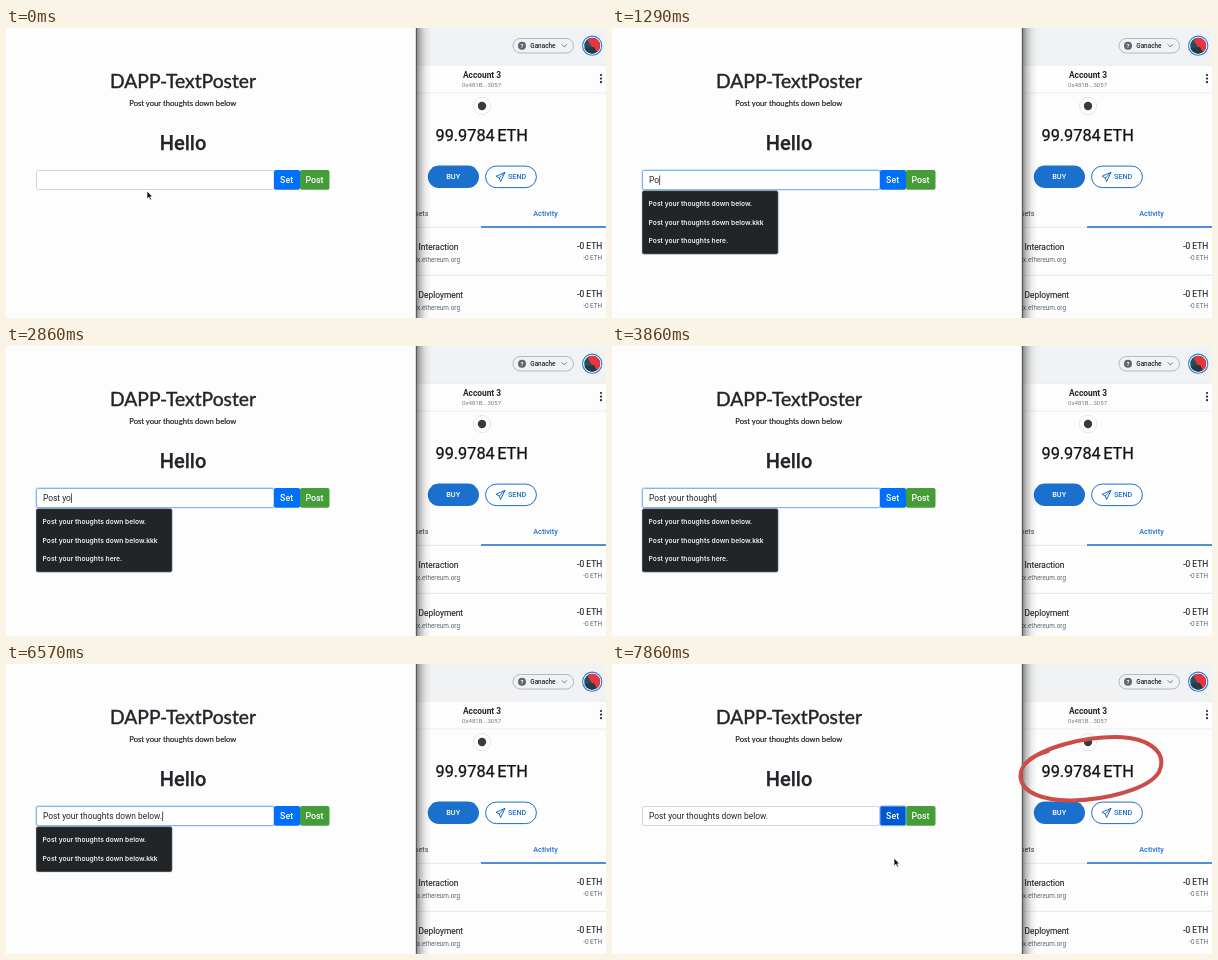
Write an HTML page that moves like this. It is 600 by 290 pixels and loops after 8000 ms.

```html
<!DOCTYPE html>
<html lang="en">
<head>
<meta charset="utf-8">
<title>DAPP-TextPoster</title>
<style>
  html, body { margin: 0; width: 100%; height: 100%; overflow: hidden; background: #fdfdfd; }
  svg { display: block; width: 600px; height: 290px; }
  text { font-family: Roboto, "Open Sans", sans-serif; fill: #212529; white-space: pre; }
  .lato { font-family: Lato, sans-serif; stroke: #212529; stroke-width: .4px; }
  .mid { text-anchor: middle; }
  .end { text-anchor: end; }
  .med { font-weight: 500; }
  .row { font-size: 8.4px; stroke: #212529; stroke-width: .12px; }
  .sub { font-size: 6.4px; fill: #5d6670; }
  .tab { font-size: 7.3px; font-weight: 500; }
  .sum { font-size: 16.3px; fill: #111; stroke: #111; stroke-width: .25px; }
  .field { font-size: 8.4px; }
  .btn { font-size: 8.8px; font-weight: 500; fill: #fff; text-anchor: middle; }
  #menu text { font: 600 6.7px Inter, sans-serif; fill: #f1f1f1; }
</style>
</head>
<body>
<svg viewBox="0 0 600 290">
  <defs>
    <linearGradient id="shade">
      <stop offset="0" stop-color="#000" stop-opacity=".5"/>
      <stop offset=".25" stop-color="#000" stop-opacity=".27"/>
      <stop offset=".6" stop-color="#000" stop-opacity=".08"/>
      <stop offset="1" stop-color="#000" stop-opacity="0"/>
    </linearGradient>
    <clipPath id="face"><circle cx="586.2" cy="17.7" r="8"/></clipPath>
    <clipPath id="side"><path d="M410 0H600V290H410Z"/></clipPath>
  </defs>
  <rect width="600" height="290" fill="#fdfdfd"/>

  <g clip-path="url(#side)">
    <rect x="410" width="190" height="37" fill="#f1f2f3"/>
    <path d="M410 37.3H600M410 65H600" stroke="#e4e6e8" stroke-width=".7"/>

    <rect x="507" y="10.5" width="60.5" height="14.5" rx="7.2" fill="none" stroke="#b4b8bd"/>
    <circle cx="516" cy="17.7" r="4" fill="#5d6670"/>
    <text class="mid" x="516" y="20" font-size="6" font-weight="700" style="fill:#fff">?</text>
    <text class="med" x="524.3" y="20.2" font-size="6.4">Ganache</text>
    <path d="M555.8 16.4l2.5 2.5 2.5-2.5" fill="none" stroke="#555" stroke-width=".8"/>

    <circle cx="586.2" cy="17.7" r="9.6" fill="#fff" stroke="#2f7fd0" stroke-width="1.1"/>
    <g clip-path="url(#face)">
      <rect x="576" y="8" width="20" height="20" fill="#24505c"/>
      <path d="M583 8H596V28H592L582 13Z" fill="#e8353f"/>
      <path d="M577 20L588 19 593 28H577Z" fill="#243b46"/>
    </g>

    <text class="mid" x="476" y="49.6" font-size="8.4" font-weight="600">Account 3</text>
    <text class="mid" x="475.6" y="59.4" font-size="6.1" style="fill:#737a82">0x481B...3057</text>
    <g fill="#24272a">
      <circle cx="595" cy="47" r="1.1"/><circle cx="595" cy="50.6" r="1.1"/><circle cx="595" cy="54.2" r="1.1"/>
    </g>

    <circle cx="476" cy="78" r="8.6" fill="#fff" stroke="#dcdfe2" stroke-width=".8"/>
    <circle cx="476" cy="78" r="4.2" fill="#3a3a3c"/>
    <text class="sum" x="429.5" y="112.8">99.9784</text>
    <text class="sum" x="491.2" y="112.8">ETH</text>

    <rect x="421.8" y="137.6" width="51.2" height="22.4" rx="11.2" fill="#1b6fcd"/>
    <text class="mid med" x="447.2" y="151.4" font-size="7.4" style="fill:#fff">BUY</text>
    <rect x="479.6" y="138.1" width="50.8" height="21.5" rx="10.7" fill="#fff" stroke="#1b6fcd"/>
    <path d="M499 144.3L490 148.3 493.3 150 494.6 153.6ZM493.3 150L499 144.3" fill="none" stroke="#1b6fcd" stroke-width="1" stroke-linejoin="round"/>
    <text class="med" x="502" y="151.4" font-size="7.2" style="fill:#1b6fcd">SEND</text>

    <text class="tab end" x="422.5" y="187.6" style="fill:#5d6670">Assets</text>
    <text class="tab mid" x="539.5" y="187.6" style="fill:#1b6fcd">Activity</text>
    <path d="M410 199.3H600M410 247.3H600" stroke="#dfe2e5" stroke-width=".8"/>
    <path d="M475 199H600" stroke="#1b6fcd" stroke-width="1.3"/>

    <g id="rows"></g>
    <rect x="410" width="15" height="290" fill="url(#shade)"/>
  </g>
  <path d="M410.3 0V290" stroke="#4c4c4c" stroke-width=".9"/>

  <text class="lato mid" x="177" y="60.2" font-size="19.3">DAPP-TextPoster</text>
  <text class="lato mid" x="176.8" y="77.8" font-size="7.7" style="stroke-width:.2px">Post your thoughts down below</text>
  <text class="mid med" x="177" y="122.3" font-size="20" stroke="#212529" stroke-width=".25">Hello</text>

  <rect id="glow" x="29.3" y="141.3" width="239.5" height="21.2" rx="3" fill="#bfdcff"/>
  <rect id="box" x="30.5" y="142.5" width="237.5" height="19" rx="2" fill="#fff" stroke="#ced4da"/>
  <text id="typed" class="field" x="37" y="155.1"></text>
  <path id="caret" d="M.6 147.5V157" stroke="#222" stroke-width=".8"/>

  <rect x="294" y="142" width="29.5" height="19.7" rx="2" fill="#449d38"/>
  <rect id="set" x="268" y="142" width="26" height="19.7" rx="1.8"/>
  <text class="btn" x="280.6" y="155.1">Set</text>
  <text class="btn" x="308.5" y="155.1">Post</text>

  <g id="menu">
    <rect x="30" y="162.6" width="136.2" rx="2" fill="#212527" stroke="#b9bcbe" stroke-width=".5"/>
    <text x="36.6" y="178.3"></text><text x="36.6" y="196.6"></text><text x="36.6" y="214.9"></text>
  </g>

  <path id="ring" pathLength="1" fill="none" stroke="#cb4d47" stroke-width="4" stroke-linecap="round" stroke-linejoin="round"
    d="M436 87C419 92 408 101 408.5 113C410 129 432 137 460 136.5C494 136 537 125 547 108C557 86 533 73 503 73C472 73 431 83 414 99"/>
  <path id="mouse" d="M0 0V8L1.9 6.3 3.1 9 4.5 8.4 3.3 5.8H5.6Z" fill="#111" stroke="#fff" stroke-width=".7"/>
</svg>
<script>
  const LOOP = 8000, RATE = 7;
  const PHRASE = 'Post your thoughts down below.';
  const OPTIONS = [PHRASE, PHRASE + 'kkk', 'Post your thoughts here.'];
  const FOCUS = 560, CLICK = 7140;

  // [ms, characters typed]
  const KEYS = [[0, 0], [990, 1], [1140, 2], [1560, 3], [1850, 4], [2500, 4], [3850, 17], [3990, 18],
    [4280, 19], [4570, 20], [4990, 23], [5280, 24], [6280, 30], [LOOP, 30]];
  const TYPO = [2130, 2420];

  // [ms, x, y] of the pointer before and after typing
  const ENTER = [[0, 141, 163], [140, 141, 163], [430, 139, 152], [990, 139, 152]];
  const LEAVE = [[6700, 139, 152], [7000, 280, 153], [7150, 280, 153], [7560, 282, 194], [LOOP, 282, 194]];

  const $ = id => document.getElementById(id);
  const show = (el, on) => { el.style.display = on ? '' : 'none'; };
  const menuBox = $('menu').querySelector('rect');
  const menuText = [...$('menu').querySelectorAll('text')];

  function along(table, t) {
    const i = Math.max(1, table.findIndex(p => p[0] >= t));
    const a = table[i - 1], b = table[i];
    const k = Math.min(1, Math.max(0, (t - a[0]) / (b[0] - a[0])));
    return a.slice(1).map((v, j) => v + (b[j + 1] - v) * k);
  }

  $('rows').innerHTML = [['Interaction', 221.8], ['Deployment', 270]].map(([name, y]) => `
    <text class="row" x="412.6" y="${y}">${name}</text>
    <text class="row end" x="596.2" y="${y - .8}">-0 ETH</text>
    <text class="sub end" x="454" y="${y + 11.8}">remix.ethereum.org</text>
    <text class="sub end" x="596.2" y="${y + 10.4}">-0 ETH</text>`).join('');

  function textAt(t) {
    if (t >= TYPO[0] && t < TYPO[1]) return 'Poste';
    return PHRASE.slice(0, Math.floor(along(KEYS, t)[0] + 1e-6));
  }

  function draw(t) {
    const text = textAt(t);
    const focus = t >= FOCUS && t < CLICK;
    const pressed = t >= CLICK;

    $('typed').textContent = text;
    show($('glow'), focus);
    $('box').setAttribute('stroke', focus ? '#80b5f5' : '#ced4da');
    show($('caret'), focus);
    $('caret').setAttribute('transform', `translate(${37 + (text ? $('typed').getComputedTextLength() : 0)})`);

    const hits = focus && text ? OPTIONS.filter(o => o.startsWith(text)) : [];
    show($('menu'), hits.length);
    menuBox.setAttribute('height', 9 + 18.2 * hits.length);
    menuText.forEach((el, i) => { el.textContent = hits[i] || ''; });

    $('set').setAttribute('fill', pressed ? '#0058d0' : '#006ffb');
    $('set').setAttribute('stroke', pressed ? '#7fb4f3' : 'none');

    const path = t < 990 ? ENTER : LEAVE;
    show($('mouse'), t < 990 || t >= LEAVE[0][0]);
    $('mouse').setAttribute('transform', `translate(${along(path, t)})`);

    const drawn = Math.min(1, (t - 7430) / 420);
    show($('ring'), drawn > 0);
    $('ring').setAttribute('stroke-dasharray', drawn < 1 ? `${Math.max(0, drawn)} 2` : 'none');
  }

  const start = performance.now();
  function tick() {
    const t = (performance.now() - start) % LOOP;
    draw(Math.floor((t + 4) * RATE / 1000) * 1000 / RATE % LOOP);
    requestAnimationFrame(tick);
  }
  tick();
</script>
</body>
</html>
```
